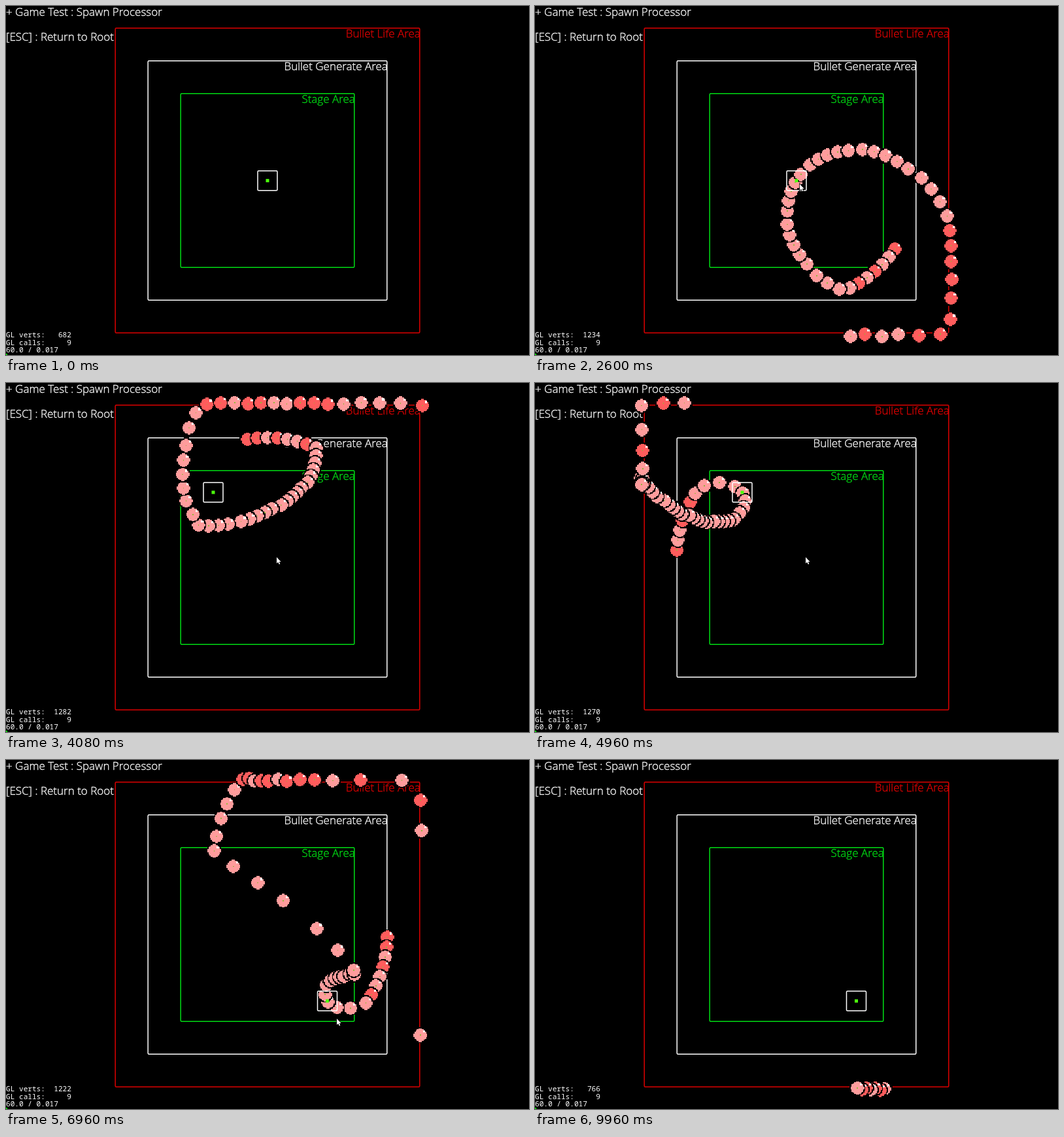
An HTML page with a canvas for the animation above (10000 ms loop, 800 by 533 pixels).

```html
<!DOCTYPE html>
<html lang="en">
<head>
<meta charset="utf-8">
<title>Spawn Processor</title>
<style>
  html, body { margin: 0; width: 100%; height: 100%; overflow: hidden; background: #000; }
  canvas { display: block; }
</style>
</head>
<body>
<canvas id="stage" width="800" height="533"></canvas>
<script>
const ctx = document.getElementById('stage').getContext('2d');
const LOOP = 10000, FRAME = 40;
const CX = 400, CY = 266.67, LIFE = 233.8, RADIUS = 183.3;
const COUNT = 150, SPEED = 5, WAIT = 23, LINGER = 37;
const BORN_BLINK = 4.2, DYING_BLINK = 6.4;
const PALE = '#ff9c9c', RED = '#ff5c5c';

// Each move eases out to a point; times are ticks, 60 per second.
const player = {
  x: CX, y: CY,
  moves: [
    { from: 161, to: 196, x: 317, y: 167, power: 1.85 },
    { from: 337.5, to: 357, x: 491.5, y: 368, power: 1.2, bow: 8 }
  ]
};
const cursor = {
  x: 722, y: 400,
  moves: [
    { from: 102, to: 130, x: 405, y: 272, power: 1.5 },
    { from: 161, to: 196, x: 322, y: 173, power: 1.85 },
    { from: 204, to: 240, x: 414, y: 266, power: 1.5 },
    { from: 300, to: 335, x: 304, y: 192, power: 1.5 },
    { from: 337.5, to: 357, x: 506, y: 395, power: 1.2 },
    { from: 584, to: 593, x: 645, y: 440, power: 1 }
  ]
};

function at(track, tick) {
  let { x, y } = track;
  for (const m of track.moves) {
    if (tick <= m.from) break;
    const s = Math.min((tick - m.from) / (m.to - m.from), 1);
    const u = 1 - (1 - s) ** m.power;
    x += (m.x - x) * u;
    y += (m.y - y) * u + (m.bow || 0) * Math.sin(Math.PI * u);
  }
  return [x, y];
}

const outside = (x, y) => Math.abs(x - CX) > LIFE || Math.abs(y - CY) > LIFE;

// Spawned around a circle, each one aimed at the player's place at its birth.
const bullets = Array.from({ length: COUNT }, (_, j) => {
  const angle = (-94.8 - 4.8 * j) * Math.PI / 180;
  const birth = Math.floor(3.2 * j + 0.3) + 1;
  const x = CX + RADIUS * Math.cos(angle), y = CY + RADIUS * Math.sin(angle);
  const [px, py] = at(player, birth);
  const d = Math.hypot(px - x, py - y);
  const dx = (px - x) / d * SPEED, dy = (py - y) / d * SPEED;
  let moves = 0;
  while (!outside(x + dx * moves, y + dy * moves)) moves++;
  return { birth, x, y, dx, dy, moves };
});

const CELLS = 15, CELL = 1.6;

function makeSprite(color) {
  const s = document.createElement('canvas');
  s.width = s.height = CELLS;
  const g = s.getContext('2d');
  const disc = (r, fill) => {
    g.fillStyle = fill;
    for (let y = 0; y < CELLS; y++)
      for (let x = 0; x < CELLS; x++)
        if (Math.hypot(x - 7, y - 7) < r) g.fillRect(x, y, 1, 1);
  };
  disc(7.3, '#000');
  disc(6.3, color);
  g.fillStyle = '#fff';
  g.fillRect(10, 3, 2, 2);
  g.fillStyle = '#94b838';
  g.fillRect(7, 7, 1, 1);
  return s;
}
const paleSprite = makeSprite(PALE), redSprite = makeSprite(RED);

const blink = (age, period) => Math.floor(age / period) % 2 === 0;

function drawBullet(b, tick) {
  const age = tick - b.birth;
  const gone = age - WAIT - b.moves;
  const m = Math.min(Math.max(age - WAIT, 0), b.moves);
  const red = age < WAIT ? blink(age, BORN_BLINK) : gone >= 0 && blink(gone, DYING_BLINK);
  const size = CELLS * CELL;
  ctx.drawImage(red ? redSprite : paleSprite,
    b.x + b.dx * m - size / 2, b.y + b.dy * m - size / 2, size, size);
}

function box(x, y, half, color) {
  ctx.strokeStyle = color;
  ctx.lineWidth = 1.5;
  ctx.beginPath();
  ctx.roundRect(x - half, y - half, half * 2, half * 2, 1.5);
  ctx.stroke();
}

function text(str, x, y, color = '#fff', align = 'left') {
  ctx.fillStyle = ctx.strokeStyle = color;
  ctx.textAlign = align;
  ctx.fillText(str, x, y);
}

// Light face with a hairline stroke, to hold its brightness on black.
function title(...args) {
  ctx.font = '300 17px "Open Sans", "Noto Sans", sans-serif';
  text(...args);
  ctx.lineWidth = 0.35;
  ctx.strokeText(...args.slice(0, 3));
}

function area(label, half, color) {
  box(CX, CY - 0.2, half, color);
  title(label, CX + half + 1, CY - half + 14.6, color, 'right');
}

function drawPlayer(tick) {
  const [x, y] = at(player, tick);
  if (player.moves.some(m => tick >= m.from - 2 && tick <= m.to + 2)) {
    ctx.fillStyle = 'rgba(255,255,220,0.2)';
    ctx.fillRect(x - 15, y - 15, 30, 30);
  }
  box(x, y, 15, '#fff');
  ctx.fillStyle = '#4cff0c';
  ctx.fillRect(x - 2.5, y - 2.5, 5, 5);
}

function drawCursor(tick) {
  const { moves } = cursor;
  if (tick < moves[0].from || tick > moves[moves.length - 1].to) return;
  const [x, y] = at(cursor, tick);
  ctx.save();
  ctx.translate(x, y);
  const arrow = new Path2D('M0 0V9.5L2.2 7.6 3.8 11 5.3 10.3 3.8 7H6.6Z');
  ctx.strokeStyle = '#000';
  ctx.lineWidth = 1.5;
  ctx.stroke(arrow);
  ctx.fillStyle = '#fff';
  ctx.fill(arrow);
  ctx.restore();
}

function draw(ms) {
  const tick = Math.floor(ms * 3 / 50);
  const live = bullets.filter(b =>
    tick >= b.birth && tick - b.birth - WAIT - b.moves <= LINGER);

  ctx.fillStyle = '#000';
  ctx.fillRect(0, 0, 800, 533);
  ctx.imageSmoothingEnabled = false;

  title('+ Game Test : Spawn Processor', 0, 15);
  title('[ESC] : Return to Root', 0, 52.5);
  area('Bullet Life Area', 232.8, '#dc0000');
  area('Bullet Generate Area', 182.8, '#fff');
  area('Stage Area', 132.8, '#00dc14');

  for (const b of live.reverse()) drawBullet(b, tick);
  drawPlayer(tick);

  ctx.font = '11.1px "Noto Sans Mono", "DejaVu Sans Mono", monospace';
  text('GL verts:' + String(682 + 12 * live.length).padStart(6), 0, 506);
  text('GL calls:' + '9'.padStart(6), 0, 517.5);
  text('60.0 / 0.017', 0, 529);
  ctx.fillStyle = '#0f0';
  ctx.fillRect(0, 531, 2, 2);
  drawCursor(tick);
}

const start = performance.now();
function loop() {
  const ms = (performance.now() - start) % LOOP;
  draw(Math.floor(ms / FRAME) * FRAME);
  requestAnimationFrame(loop);
}
loop();
</script>
</body>
</html>
```
